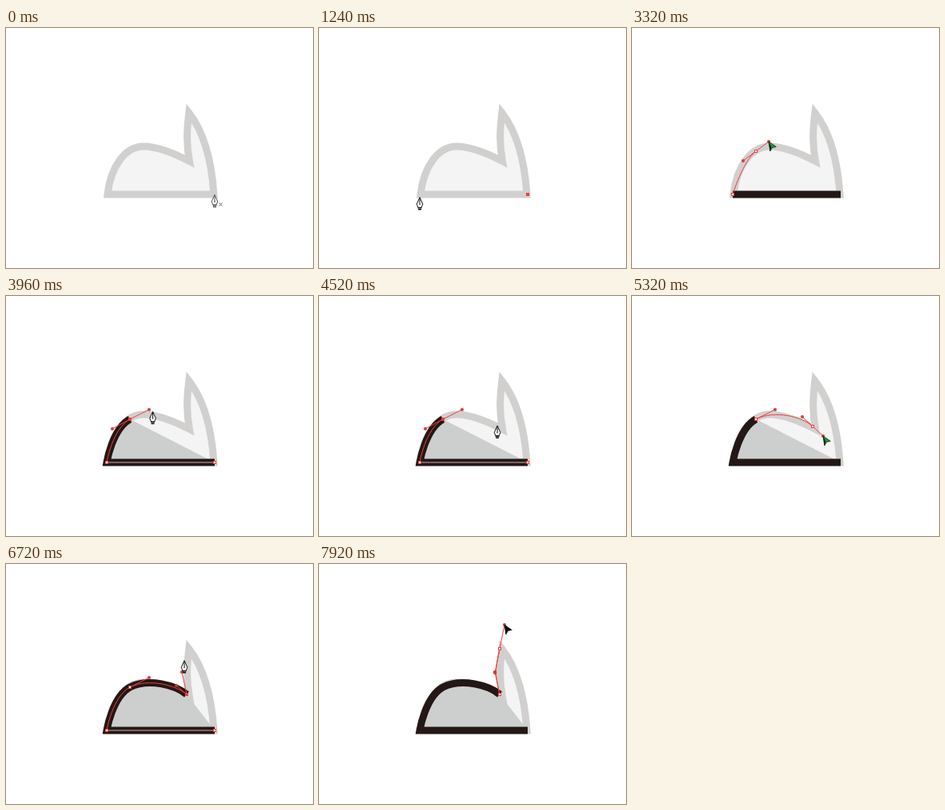
Animation, 384 px wide and 300 px high, one loop 8000 ms. Source, as an HTML page:

```html
<!DOCTYPE html>
<html lang="en">
<head>
<meta charset="utf-8">
<title>Pen tool drawing</title>
<style>
  html, body { margin: 0; width: 100%; height: 100%; overflow: hidden; background: #fff; }
  svg { display: block; width: 100vw; height: 100vh; }
  .guide { fill: #f4f4f4; stroke: #d1d0cf; stroke-width: 9; stroke-miterlimit: 10; }
  .ink { fill: #cdcfce; stroke: #231815; stroke-width: 9; stroke-miterlimit: 10; }
  .red { fill: none; stroke: #f23c3c; stroke-width: 1; }
  .base { fill: none; stroke: #d3aaaa; stroke-width: 1; }
  .node { fill: #fff; stroke: #f23c3c; stroke-width: 1; shape-rendering: crispEdges; }
  .node.on { fill: #f23c3c; }
  .dot { fill: #e0383c; stroke: #a33; stroke-width: .5; }
</style>
</head>
<body>
<svg viewBox="0 0 384 300">
  <path class="guide" d="M127 208C131 172 150 148 172 148C190 148 212 157.500 229.500 166.500C225.500 145 226 129 228.800 106C246 128 257 163 260 208Z"/>
  <path id="ink" class="ink"/>
  <g id="marks"></g>
  <g id="pen" stroke="#111" fill="#fff">
    <path d="M0 .5L-3.800 9L-2 13.200H2L3.800 9Z"/>
    <path d="M0 1V8.500" fill="none"/>
    <circle cy="9" r=".8" fill="#111" stroke="none"/>
    <path d="M-2.500 13.500H2.500M-2 15.500H2" fill="none" stroke-width="1.400"/>
    <path id="cross" d="M5.500 10.500L9.500 14.500M9.500 10.500L5.500 14.500" fill="none" stroke-width=".9"/>
  </g>
  <g id="arrow">
    <path id="head" d="M0 0L9.300 6.500L4.500 7.500L1.800 12Z" stroke="#111" stroke-width=".7"/>
    <path d="M0 0L3.200 7L1.800 12Z" fill="#111"/>
  </g>
</svg>
<script>
(() => {
  const LOOP = 8000, STEP = 40;
  const el = id => document.getElementById(id);

  // Anchors in drawing order, with their handles
  const A = [261, 208], B = [126, 208], C = [155, 154], D = [226, 163], E = [226, 106];
  const C_IN = [133, 166], C_OUT = [179, 142], D_IN = [213, 152], D_OUT = [220, 135];

  // Each move eases the cursor from where it rests to a new point
  const moves = [
    { from: 480, to: 1040, at: [126, 213] },
    { from: 1240, to: 1400, at: B },
    { from: 2120, to: 2600, at: C },
    { from: 2880, to: 3320, at: [171, 142] },
    { from: 3360, to: 3800, at: C_OUT },
    { from: 3960, to: 4720, at: D },
    { from: 4880, to: 5320, at: [239, 175] },
    { from: 5440, to: 5920, at: [222, 137] },
    { from: 6280, to: 6320, at: D_OUT },
    { from: 6640, to: 7000, at: E },
    { from: 7440, to: 7920, at: [232, 76] }
  ];

  // Times when the button goes down and up
  const presses = [[1800, 1920], [2880, 3960], [4880, 6520], [7440, LOOP]];

  const easeOut = u => 1 - (1 - u) ** 2;
  const mix = (p, q, u) => p.map((v, i) => v + (q[i] - v) * u);

  function cursorAt(t) {
    let p = A;
    for (const { from, to, at } of moves) {
      if (t < from) break;
      p = mix(p, at, easeOut(Math.min(1, (t - from + STEP) / (to - from + STEP))));
    }
    return p;
  }

  const mirror = (p, c) => mix(p, c, 2);
  const moveTo = p => `M${p}`;
  const lineTo = p => `L${p}`;
  const curveTo = (a, b, p) => `C${a} ${b} ${p}`;
  const path = (d, cls = "red") => `<path class="${cls}" d="${d}"/>`;
  const node = (p, on) =>
    `<rect class="node${on ? " on" : ""}" x="${p[0] - 1.5}" y="${p[1] - 1.5}" width="3" height="3"/>`;
  const handle = (p, h) =>
    path(moveTo(p) + lineTo(h)) + `<circle class="dot" cx="${h[0]}" cy="${h[1]}" r="1.8"/>`;

  const floor = moveTo(A) + lineTo(B);
  const back = curveTo(B, C_IN, C);
  const crest = curveTo(C_OUT, D_IN, D);

  function inkAt(t) {
    if (t < 1920) return "";
    return floor + (t >= 3960 ? back : "") + (t >= 6520 ? crest : "");
  }

  // Curve from anchor p to q while q's outgoing handle is dragged
  const rubber = (p, out, q, opp, tip) =>
    path(moveTo(p) + curveTo(out, opp, q)) + (out === p ? "" : handle(p, out)) +
    handle(q, opp) + handle(q, tip) + node(p) + node(q);

  function preview(t, tip) {
    if (t < 1920) return path(floor) + node(A) + node(B);
    if (t < 3960) return rubber(B, B, C, mirror(tip, C), tip);
    if (t < 6520) return rubber(C, C_OUT, D, t < 5440 ? mirror(tip, D) : D_IN, tip);
    return rubber(D, D_OUT, E, mirror(tip, E), tip);
  }

  // Selected path with its anchors
  function selection(t) {
    if (t < 480) return "";
    if (t < 1920) return node(A, true);
    const base = path(floor, "base") + node(A);
    if (t < 3960) return base + node(B, true);
    if (t < 6520) {
      return base + path(moveTo(B) + back) + handle(C, C_IN) + handle(C, C_OUT) +
        node(B) + node(C, true);
    }
    return base + path(moveTo(B) + back + crest) + handle(C, C_OUT) +
      handle(D, D_IN) + handle(D, D_OUT) + node(B) + node(C) + node(D, true);
  }

  const show = (id, on) => el(id).setAttribute("display", on ? "inline" : "none");
  const place = (id, [x, y]) => el(id).setAttribute("transform", `translate(${x} ${y})`);

  function draw(t) {
    const tip = cursorAt(t);
    const held = presses.some(([down, up]) => t >= down && t < up);
    el("ink").setAttribute("d", inkAt(t));
    el("marks").innerHTML = held ? preview(t, tip) : selection(t);
    show("pen", !held);
    show("arrow", held);
    show("cross", t < 480);
    place("pen", tip);
    place("arrow", tip);
    el("pen").setAttribute("stroke", t < 480 ? "#555" : "#111");
    el("head").setAttribute("fill", t < 7440 ? "#169b2f" : "#111");
  }

  const start = performance.now();
  function tick() {
    const t = (performance.now() - start) % LOOP;
    draw(Math.floor(t / STEP) * STEP);
    requestAnimationFrame(tick);
  }
  tick();
})();
</script>
</body>
</html>
```
